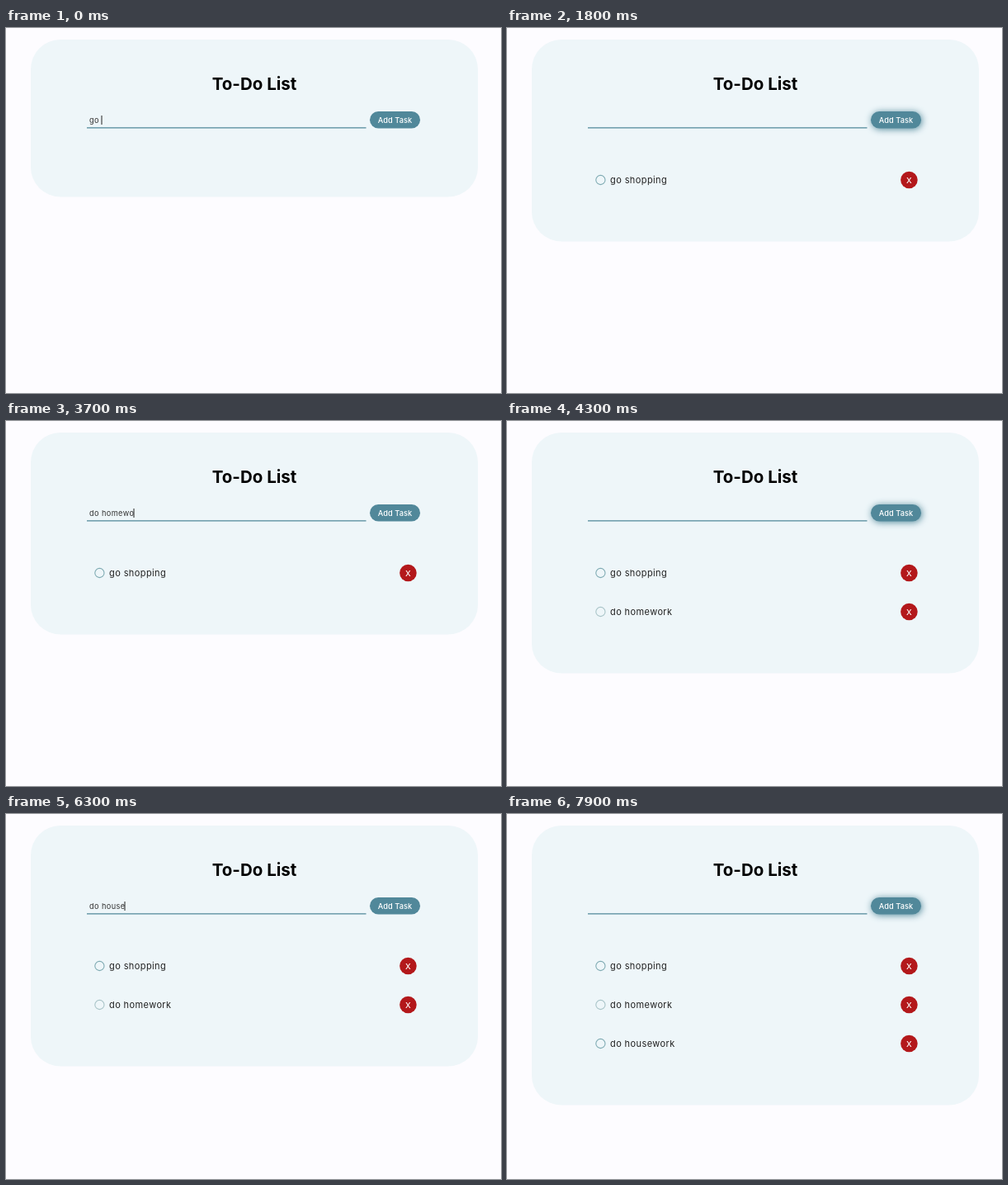
An HTML page with a canvas that plays this animation: 600 px wide and 442 px high, repeating every 8000 ms.

```html
<!DOCTYPE html>
<html lang="en">
<head>
<meta charset="utf-8">
<title>To-Do List</title>
<style>
  html, body { margin: 0; width: 100%; height: 100%; overflow: hidden; background: #fdfcff; }
  canvas { display: block; width: 600px; height: 442px; }
</style>
</head>
<body>
<canvas id="stage"></canvas>
<script>
const LOOP = 8000;
const TEAL = '#51889a';
const TASKS = ['go shopping', 'do homework', 'do housework'];
const ADDED = [1700, 4300, 7800];
const HOVERS = [[1700, 2000], [4300, 4700], [7800, 8000]];

// Input contents from each time on; "|" is the caret.
const TYPING = [
  [0, 'go |'], [100, 'go s|'], [200, 'go sh|'], [300, 'go sho|'],
  [500, 'go shop|'], [600, 'go shopp|'],
  [800, 'go shoppi|'], [900, 'go shoppin|'], [1000, 'go shopping|'], [1500, 'go shopping'],
  [1700, ''], [2000, '|'], [2300, 'd|'], [2400, 'do|'], [2500, 'do |'],
  [2900, 'do h|'], [3000, 'do ho|'], [3200, 'do hom|'], [3300, 'do home|'],
  [3600, 'do homew|'], [3700, 'do homewo|'], [3900, 'do homewor|'], [4000, 'do homework|'],
  [4300, ''], [4700, '|'], [5200, 'd|'], [5300, 'do |'], [5500, 'do '],
  [5600, 'do h|'], [5800, 'do ho|'], [5900, 'do hou|'], [6100, 'do hous|'], [6200, 'do house|'],
  [6500, 'do housew|'], [6700, 'do housewo|'], [7000, 'do housewor|'], [7200, 'do housework|'],
  [7600, 'do housework'], [7800, '']
];

const canvas = document.getElementById('stage');
const ctx = canvas.getContext('2d');
const ratio = window.devicePixelRatio || 1;
canvas.width = 600 * ratio;
canvas.height = 442 * ratio;

function box(x, y, w, h, r, color) {
  ctx.fillStyle = color;
  ctx.beginPath();
  ctx.roundRect(x, y, w, h, r);
  ctx.fill();
}

function circle(x, y, r) {
  ctx.beginPath();
  ctx.arc(x, y, r, 0, Math.PI * 2);
}

function label(str, x, y, size, weight, color, align = 'left', spacing = 0) {
  ctx.font = `${weight} ${size}px Inter, sans-serif`;
  ctx.letterSpacing = spacing + 'px';
  ctx.textAlign = align;
  ctx.fillStyle = color;
  ctx.fillText(str, x, y);
  return ctx.measureText(str).width;
}

function drawInput(t) {
  const value = TYPING.findLast(([start]) => start <= t)[1];
  const width = label(value.replace('|', ''), 101, 115, 9.2, 400, '#333', 'left', 0.4);
  if (value.endsWith('|')) box(Math.round(101 + width) - 0.5, 106, 1, 11, 0, '#222');
  box(98, 120.2, 338.5, 1.2, 0, TEAL);
}

function drawButton(hover) {
  ctx.save();
  if (hover) {
    ctx.shadowColor = TEAL;
    ctx.shadowBlur = 9 * ratio;
    ctx.shadowOffsetX = ctx.shadowOffsetY = ratio;
  }
  box(441, 101, 61, 20.5, 10.25, TEAL);
  ctx.restore();
  label('Add Task', 471.5, 115, 9.2, 500, '#fff', 'center', 0.05);
}

function drawTask(name, i) {
  const y = 184 + 47 * i;
  ctx.strokeStyle = i === 1 ? '#a9c4c8' : '#7fabb3';
  ctx.lineWidth = 1.1;
  circle(113.4, y, 5.6);
  ctx.stroke();
  label(name, 125, y + 4, 11, 400, '#222', 'left', 0.4);
  ctx.fillStyle = '#b3181b';
  circle(487.4, y, 10.3);
  ctx.fill();
  label('X', 487.4, y + 3.5, 9.5, 500, '#fff', 'center');
}

function draw(now) {
  const t = now % LOOP;
  const count = ADDED.filter(start => start <= t).length;
  const bottom = count ? 211.5 + 47 * count : 204.5;

  ctx.setTransform(ratio, 0, 0, ratio, 0, 0);
  box(0, 0, 600, 442, 0, '#fdfcff');
  box(30, 14, 542, bottom - 14, 36, '#eef6f9');
  label('To-Do List', 301, 74.5, 20.5, 700, '#000', 'center');
  drawInput(t);
  drawButton(HOVERS.some(([from, to]) => t >= from && t < to));
  TASKS.slice(0, count).forEach(drawTask);
  requestAnimationFrame(frame);
}

const start = performance.now();
function frame() {
  draw(performance.now() - start);
}
frame();
</script>
</body>
</html>
```
